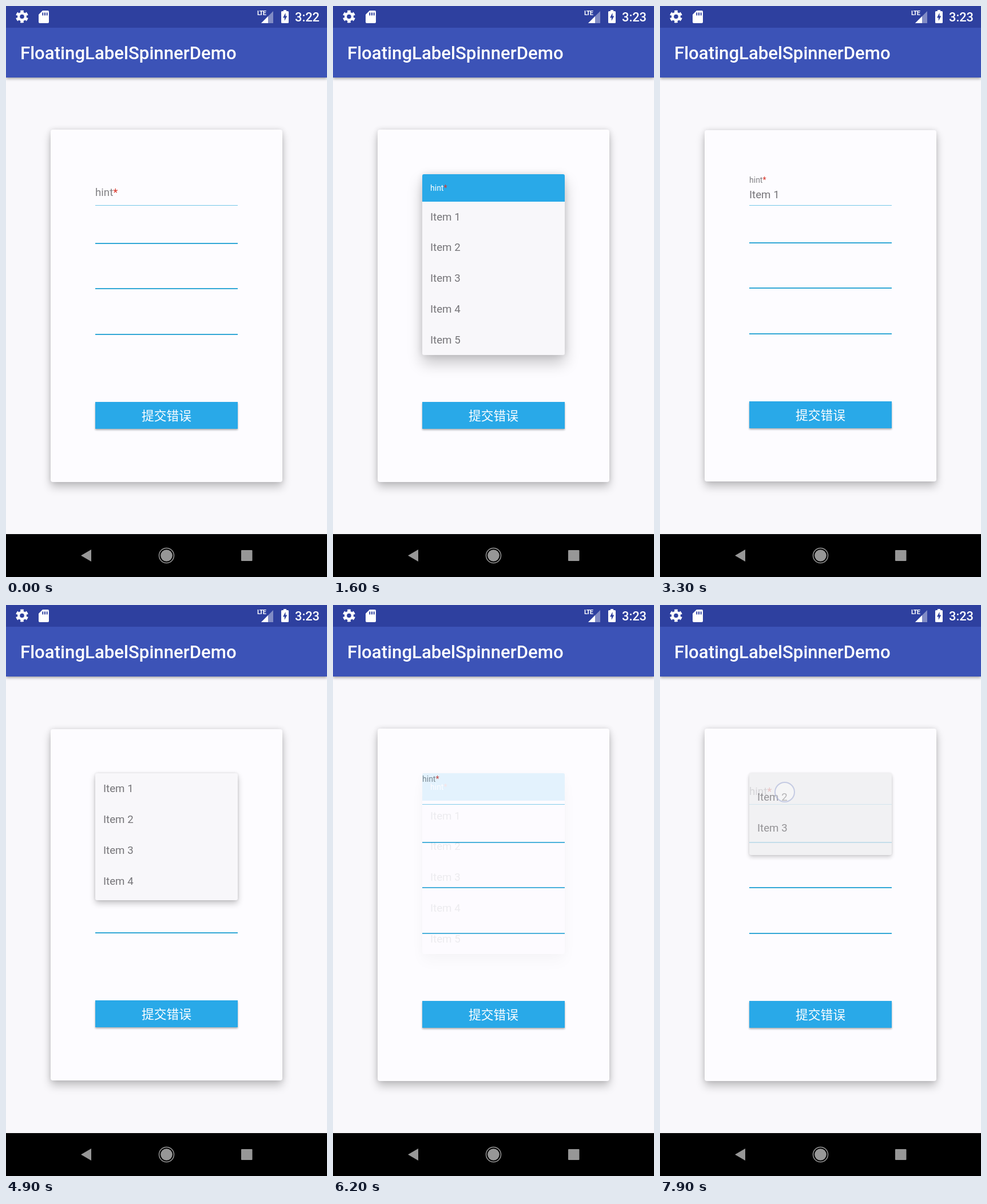
An HTML page that plays this animation: 561x998 px, repeating every 8000 ms.

```html
<!DOCTYPE html>
<html lang="en">
<head>
<meta charset="utf-8">
<title>Floating label spinner</title>
<style>
  html, body { margin: 0; width: 100%; height: 100%; overflow: hidden; }
  body { position: relative; background: #f9f8fb; color: #767579; font: 18.7px Roboto, sans-serif; }
  div, svg { position: absolute; white-space: nowrap; }

  /* The timeline is 10 s long, so 1% is 100 ms; the script loops its first 8 s. */
  .anim { animation: 10s linear both paused; }
  .step { animation-timing-function: step-end; }

  .status { width: 561px; height: 38px; background: #2e409f; }
  .bar {
    top: 37px; width: 561px; height: 88px; background: #3c53b7;
    box-shadow: 0 2px 5px rgba(0, 0, 0, .36);
  }
  .title { left: 25px; top: 52px; font-size: 31.17px; font-weight: 500; line-height: 62px; color: #fff; }
  .clock { right: 13px; top: 0; font-size: 21.8px; font-weight: 500; line-height: 39px; color: #fff; }
  .old { animation-name: old; }
  .new { animation-name: new; }
  .lte { left: 439px; top: 6px; font-size: 11px; font-weight: 700; line-height: 14px; letter-spacing: -1px; color: #fff; }
  .nav { top: 923px; width: 561px; height: 75px; background: #000; }

  .card {
    left: 78px; top: 216px; width: 405px; height: 616px; border-radius: 4px; background: #fdfcff;
    box-shadow: 0 9px 16px rgba(0, 0, 0, .22), 0 0 10px rgba(0, 0, 0, .13);
    animation-name: settle;
  }
  .lower { left: 156px; top: 0; width: 249px; animation-name: nudge; }
  .line { width: 249px; height: 2px; background: #32a8d6; }
  .thin { left: 156px; top: 348px; height: 1px; background: #74c6e8; }
  .button {
    top: 692px; width: 249px; height: 47px; background: #29a9e8;
    box-shadow: 0 2px 3px rgba(0, 0, 0, .32);
    font: 21.8px/45px "Noto Sans CJK SC", "Noto Sans CJK", sans-serif; text-align: center; color: #fff;
  }

  .label, .value { left: 156px; line-height: 24px; }
  .label { top: 314px; color: #828185; transform-origin: 0 50%; animation-name: float; animation-timing-function: ease-in-out; }
  .value { top: 318px; animation-name: value; }
  .star { color: #d8362b; }

  .popup {
    left: 156px; top: 294px; width: 249px; height: 316px; overflow: hidden; border-radius: 3px;
    animation-name: reveal, fade, lift;
    animation-timing-function: cubic-bezier(.4, 0, .2, 1), linear, linear;
  }
  .list { top: 50%; width: 249px; height: 316px; margin-top: -158px; }
  .head {
    width: 235px; height: 47.5px; padding-left: 14px; background: #29a9e8;
    font-size: 14.03px; line-height: 49.5px; color: #fff;
  }
  .row { left: 0; width: 235px; height: 53.8px; padding-left: 14px; line-height: 55.6px; }
  .press { top: 47.5px; width: 249px; height: 53.8px; overflow: hidden; background: rgba(0, 0, 0, .035); animation-name: press; }
  .ripple {
    left: 19px; top: -37px; width: 124px; height: 124px; border-radius: 50%;
    background: rgba(0, 0, 0, .04); animation-name: ripple;
  }
  .touch {
    left: -18px; top: -18px; width: 32px; height: 32px; border-radius: 50%;
    border: 2px solid rgba(150, 162, 208, .5); background: rgba(255, 255, 255, .3);
    animation-name: touch;
  }

  @keyframes old { 0% { visibility: visible } 5%, 100% { visibility: hidden } }
  @keyframes new { 0% { visibility: hidden } 5%, 100% { visibility: visible } }
  @keyframes settle {
    0%, 58%, 100% { top: 216px; height: 616px }
    23% { top: 217px; height: 614px }
  }
  @keyframes nudge {
    0%, 58%, 100% { transform: none }
    23% { transform: translateY(-1px) }
  }
  @keyframes float {
    0%, 30.5%, 68%, 100% { transform: none }
    33%, 65.5% { transform: translateY(-22px) scale(.75) }
  }
  @keyframes value {
    0%, 31%, 60%, 100% { opacity: 0 }
    33%, 59.9% { opacity: 1 }
  }
  @keyframes reveal {
    0%, 13.17%, 40.01%, 47.88%, 75.01%, 78.17% { height: 0 }
    15.67%, 40%, 50.38%, 75%, 80.67%, 100% { height: 316px }
  }
  @keyframes fade {
    0%, 13.17%, 47.88%, 78.17% { opacity: 0; background: #c9c8cb }
    14.23%, 24.9%, 48.94%, 59.9%, 79.23%, 100% { opacity: 1; background: #f8f7fa }
    27.3%, 62.3% { opacity: 0; background: #f8f7fa }
  }
  @keyframes lift {
    0%, 13.17%, 40%, 47.88%, 75%, 78.17% {
      box-shadow: 0 0 0 rgba(0, 0, 0, .22), 0 0 0 rgba(0, 0, 0, .13);
    }
    16%, 39.9%, 50.7%, 74.9%, 81%, 100% {
      box-shadow: 0 14px 26px rgba(0, 0, 0, .22), 0 0 14px rgba(0, 0, 0, .13);
    }
  }
  @keyframes press { 0%, 28%, 100% { opacity: 0 } 24% { opacity: 1 } }
  @keyframes ripple { 0%, 24% { transform: scale(.5) } 28%, 100% { transform: scale(2.5) } }
  @keyframes touch {
    0%, 14%, 26%, 48%, 60% { opacity: 0 }
    12% { opacity: 1; transform: translate(222px, 330px) }
    23% { opacity: 1; transform: translate(229px, 366px) }
    46% { opacity: 1; transform: translate(217px, 335px) }
    58% { opacity: 1; transform: translate(225px, 319px) }
    77%, 100% { opacity: 1; transform: translate(218px, 327px) }
  }
</style>
</head>
<body>
  <div class="bar"></div>
  <div class="title">FloatingLabelSpinnerDemo</div>

  <div class="status">
    <svg width="561" height="38" fill="#fff">
      <g transform="translate(28 18.5)">
        <circle r="8"/>
        <circle r="9" fill="none" stroke="#fff" stroke-width="4" pathLength="6" stroke-dasharray=".57 .43" transform="rotate(12.9)"/>
        <circle r="3.8" fill="#2e409f"/>
      </g>
      <path d="M64 8h9q2 0 2 2v18q0 2-2 2H59q-2 0-2-2V15z"/>
      <path d="M64.3 11.5v5M68 11.5v5M71.7 11.5v5" stroke="#2e409f" stroke-width="2"/>
      <path d="M446 30l21-21v21z" opacity=".4"/>
      <path d="M446 30l12-12v12z"/>
      <path d="M485 7h5v2h2.500q1.500 0 1.500 1.500v18q0 1.500-1.500 1.500h-10q-1.500 0-1.500-1.500v-18q0-1.500 1.500-1.500H485z"/>
      <path d="M488.500 12l-4.500 8.500h2.800v5.500l4.500-8.500h-2.800z" fill="#2e409f"/>
    </svg>
    <div class="lte">LTE</div>
    <div class="clock old anim step">3:22</div>
    <div class="clock new anim step">3:23</div>
  </div>

  <div class="card anim step"></div>
  <div class="line thin"></div>
  <div class="lower anim step">
    <div class="line" style="top:414px"></div>
    <div class="line" style="top:493px"></div>
    <div class="line" style="top:573px"></div>
    <div class="button" lang="zh">提交错误</div>
  </div>
  <div class="label anim">hint<span class="star">*</span></div>
  <div class="value anim">Item 1</div>

  <div class="popup anim">
    <div class="list">
      <div class="head">hint<span class="star">*</span></div>
      <div class="press anim step"><div class="ripple anim"></div></div>
    </div>
  </div>
  <div class="touch anim step"></div>

  <div class="nav">
    <svg width="561" height="75" fill="#979797">
      <path d="M131 37.500l18-10.500v21z"/>
      <circle cx="280.500" cy="37.500" r="10.300"/>
      <circle cx="280.500" cy="37.500" r="13" fill="none" stroke="#979797" stroke-width="1.500"/>
      <rect x="411" y="28" width="19.500" height="19" rx="1"/>
    </svg>
  </div>

<script>
  const LOOP = 8000, STEP = 100;
  const list = document.querySelector('.list');
  for (let i = 0; i < 5; i++) {
    const row = document.createElement('div');
    row.className = 'row';
    row.style.top = 47.5 + i * 53.8 + 'px';
    row.textContent = 'Item ' + (i + 1);
    list.append(row);
  }

  // Advance every paused animation in 100 ms ticks.
  const parts = document.getAnimations();
  const start = performance.now();
  function draw() {
    const time = (performance.now() - start) % LOOP;
    const tick = Math.floor(time / STEP) * STEP;
    for (const part of parts) part.currentTime = tick;
    requestAnimationFrame(draw);
  }
  draw();
</script>
</body>
</html>
```
